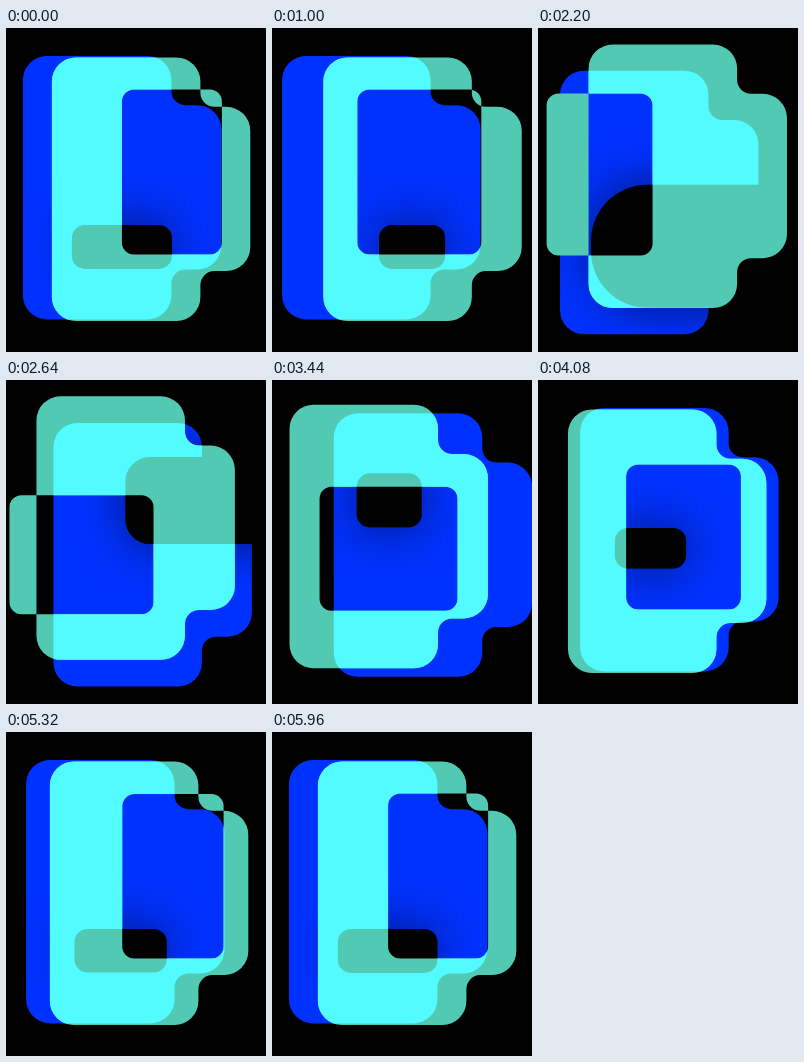
An HTML page with a canvas that plays this animation: 260x324 px, repeating every 6 s.

```html
<!DOCTYPE html>
<html lang="en">
<head>
<meta charset="utf-8">
<title>Overlapping shapes</title>
<style>
  html, body { margin: 0; width: 100%; height: 100%; overflow: hidden; background: #000; }
  canvas { display: block; }
</style>
</head>
<body>
<canvas id="stage" width="260" height="324"></canvas>
<script>
const LOOP = 6000;
const BLUE = '#0032ff', TEAL = '#52c9b3', CYAN = '#52fbff';
const ctx = document.getElementById('stage').getContext('2d');

const progress = (t, from, to) => Math.min(1, Math.max(0, (t - from) / (to - from)));
const smooth = u => u * u * (3 - 2 * u);
const easeIn = u => u * u;
const easeOut = u => u * (2 - u);

// Sideways: speed up towards one side, swing across, then drift back to rest.
function slide(t, rest, near, far, turn, swingStart, swingEnd) {
  return rest + (near - rest) * easeIn(progress(t, 0, turn))
              + (far - near) * smooth(progress(t, swingStart, swingEnd))
              + (rest - far) * easeOut(progress(t, 3440, LOOP));
}

// Vertical separation: one smooth rise and fall.
const lift = t => 15.9 * (smooth(progress(t, 1000, 2420)) - smooth(progress(t, 2420, 4100)));

// Key poses of the holes: left, top, right, bottom relative to their body.
const poses = [
  { t: 0,    blue: [49, 169, 149, 213],   teal: [70, 32, 170, 197] },
  { t: 1000, blue: [97, 169, 163, 213],   teal: [34, 32, 158, 197] },
  { t: 2200, blue: [31, 114, 260, 237],   teal: [-42, 49, 64, 211] },
  { t: 2640, blue: [72, 34, 260, 121],    teal: [-27, 99, 117, 218] },
  { t: 3440, blue: [23, 60, 88, 114],     teal: [30, 82, 168, 206] },
  { t: 4760, blue: [48, 169, 132, 212],   teal: [73, 34, 175, 197] }
];

// Periodic cubic through the poses, without overshoot.
function holeEdge(t, name, edge) {
  const n = poses.length;
  const pose = i => poses[(i + n) % n];
  const time = i => pose(i).t + LOOP * Math.floor(i / n);
  const value = i => pose(i)[name][edge];
  const slope = i => (value(i + 1) - value(i)) / (time(i + 1) - time(i));
  const tangent = i => {
    const a = slope(i - 1), b = slope(i);
    return a * b > 0 ? 2 * a * b / (a + b) : 0;
  };
  let i = n - 1;
  while (poses[i].t > t) i--;
  const span = time(i + 1) - time(i), u = (t - time(i)) / span, v = 1 - u;
  return v * v * ((1 + 2 * u) * value(i) + u * span * tangent(i)) +
         u * u * ((1 + 2 * v) * value(i + 1) - v * span * tangent((i + 1) % n));
}

function holePath(t, name, x, y, radius) {
  const [left, top, right, bottom] = [0, 1, 2, 3].map(edge => holeEdge(t, name, edge));
  const p = new Path2D();
  p.roundRect(x + left, y + top, right - left, bottom - top, radius(bottom - top));
  return p;
}

function bodyPath(x, y) {
  const W = 148.5, R = 198.4, H = 263.5, top = 49.3, bottom = 213.6;
  const corners = [[W, 0], [W, top], [R, top], [R, bottom], [W, bottom], [W, H], [0, H], [0, 0]];
  const p = new Path2D();
  p.moveTo(x + W / 2, y);
  corners.forEach(([cx, cy], i) => {
    const [nx, ny] = corners[i + 1] || [W / 2, 0];
    const inner = cx === W && (cy === top || cy === bottom);
    p.arcTo(x + cx, y + cy, x + nx, y + ny, inner ? 14 : 24);
  });
  p.closePath();
  return p;
}

function clipOutside(hole) {
  const p = new Path2D(hole);
  p.rect(-400, -400, 1200, 1200);
  ctx.clip(p, 'evenodd');
}

function draw(t) {
  const bx = slide(t, 16.9, 1.5, 61.8, 1500, 1610, 3120), by = 27.9 + lift(t);
  const tx = slide(t, 45.9, 59.8, 17.5, 1600, 1800, 3130), ty = 29.5 - 0.87 * lift(t);
  const blue = bodyPath(bx, by), teal = bodyPath(tx, ty);
  // Tall blue holes get rounder.
  const blueGap = holePath(t, 'blue', bx, by, h => Math.max(13, 0.9 * h - 54));
  const tealGap = holePath(t, 'teal', tx, ty, () => 12);

  ctx.fillStyle = '#000';
  ctx.fillRect(0, 0, 260, 324);

  // Blue body with a soft shadow around its hole.
  ctx.save();
  clipOutside(blueGap);
  ctx.fillStyle = BLUE;
  ctx.fill(blue);
  ctx.clip(blue);
  ctx.fillStyle = '#000';
  ctx.shadowColor = 'rgba(0, 0, 0, 0.55)';
  ctx.shadowBlur = 50;
  ctx.fill(blueGap);
  ctx.restore();

  // Teal body; its hole turns solid where it sticks out.
  const tealShape = new Path2D(teal);
  tealShape.addPath(tealGap);
  ctx.fillStyle = TEAL;
  ctx.fill(tealShape, 'evenodd');

  // Shared area of both bodies.
  ctx.save();
  ctx.clip(blue);
  clipOutside(blueGap);
  clipOutside(tealGap);
  ctx.fillStyle = CYAN;
  ctx.fill(teal);
  ctx.restore();
}

const start = performance.now();
function tick() {
  draw((performance.now() - start) % LOOP);
  requestAnimationFrame(tick);
}
tick();
</script>
</body>
</html>
```
